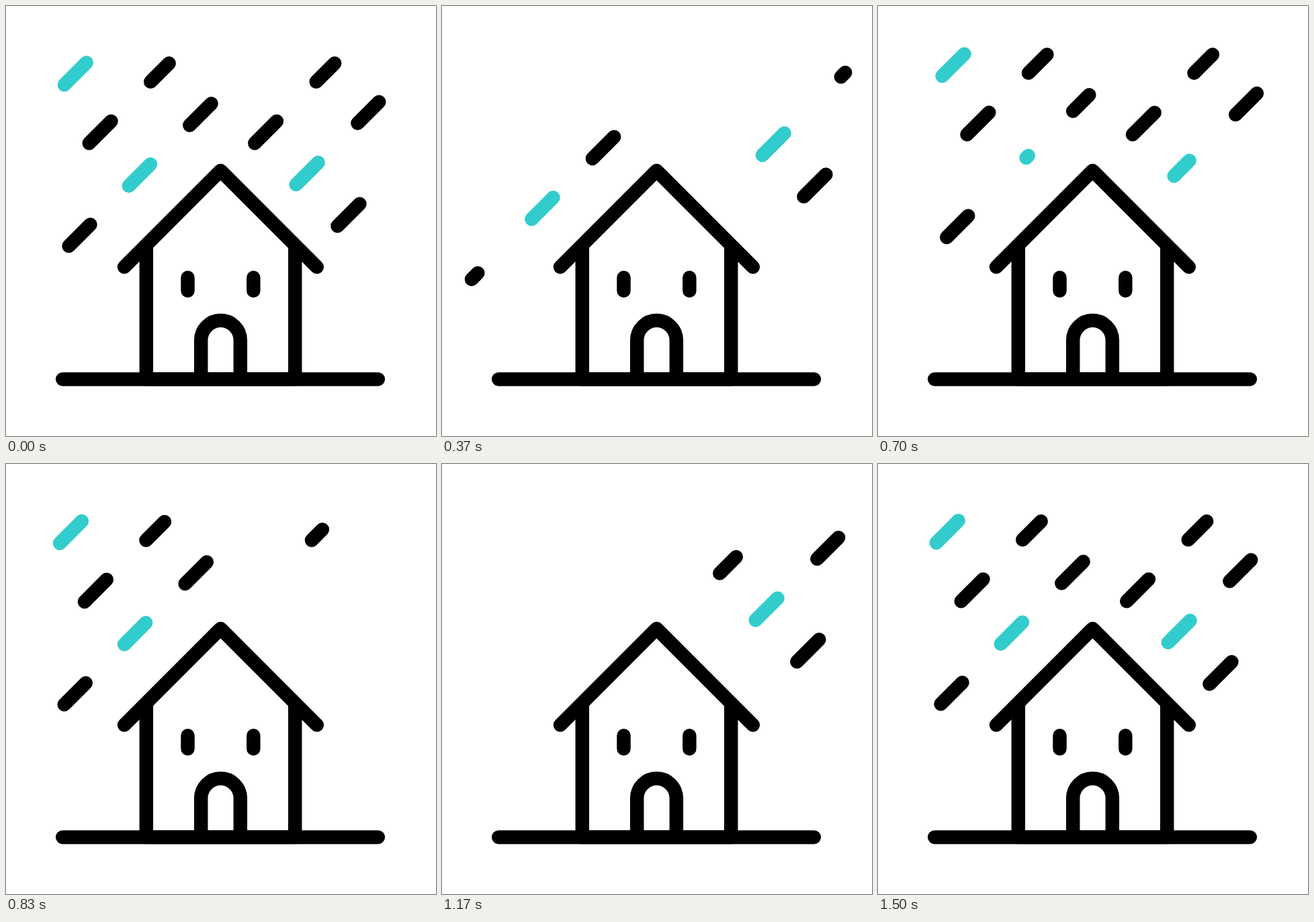
An HTML page with a canvas that plays this animation: 640x640 px, repeating every 1670 ms.

```html
<!DOCTYPE html>
<html lang="en">
<head>
<meta charset="utf-8">
<title>House in the rain</title>
<style>
  html, body { margin: 0; width: 100%; height: 100%; overflow: hidden; background: #fff; }
  canvas { display: block; width: 640px; height: 640px; }
</style>
</head>
<body>
<canvas id="stage" width="640" height="640"></canvas>
<script>
const ctx = document.getElementById('stage').getContext('2d');
const LOOP = 1670;
const LAST_STEP = 45;
const BLACK = '#000';
const TEAL = '#33cccc';

// Lower-left end, diagonal extent, colour, and the steps at which
// the drop starts to shrink (first pass) and to grow (second pass).
const drops = [
  [493.4, 327.5, 33.0, BLACK, 1.0, 7.5],
  [431.8, 265.8, 32.8, TEAL, 2.4, 8.6],
  [523.4, 174.6, 31.8, BLACK, 4.55, 10.6],
  [370.2, 204.2, 32.7, BLACK, 5.0, 11.5],
  [461.7, 112.7, 27.5, BLACK, 6.16, 13.4],
  [123.7, 204.2, 32.8, BLACK, 7.0, 14.0],
  [215.2, 112.7, 27.5, BLACK, 8.0, 14.8],
  [86.8, 117.2, 32.9, TEAL, 8.9, 16.55],
  [93.5, 357.2, 32.0, BLACK, 9.58, 18.0],
  [273.3, 177.5, 32.3, BLACK, 11.0, 19.5],
  [182.8, 267.8, 32.2, TEAL, 12.0, 20.8]
].map(([x, y, size, color, shrink, grow]) => ({ x, y, size, color, shrink, grow }));

const TRIM_STEPS = 2;

// Three overlapping falls: leaving, crossing and arriving.
const passes = [
  {
    shrinkDelay: 0,
    growDelay: -Infinity,
    shift(step) {
      const d = 0.889 * Math.pow(step, 1.676);
      return [-d, d];
    }
  },
  {
    shrinkDelay: 18,
    growDelay: 0,
    shift(step) {
      const u = step - 17;
      return [23.7 - 3.66 * u - 0.0186 * u * u, -25.7 + 3.13 * u + 0.0214 * u * u];
    }
  },
  {
    shrinkDelay: Infinity,
    growDelay: 22,
    shift(step) {
      const left = LAST_STEP - step;
      const d = 3.23 * left + 0.026 * left * left;
      return [d, -0.953 * d];
    }
  }
];

const clamp = v => Math.min(1, Math.max(0, v));

function stroke(color, trace) {
  ctx.strokeStyle = color;
  ctx.beginPath();
  trace();
  ctx.stroke();
}

function polyline(color, ...points) {
  stroke(color, () => points.forEach(([x, y]) => ctx.lineTo(x, y)));
}

function drawRain(step) {
  for (const pass of passes) {
    const [dx, dy] = pass.shift(step);
    for (const d of drops) {
      const grown = clamp((step - d.grow - pass.growDelay) / TRIM_STEPS);
      const lost = clamp((step - d.shrink - pass.shrinkDelay) / TRIM_STEPS);
      if (grown <= 0 || lost >= 1) continue;
      const x = d.x + dx, y = d.y + dy;
      const low = d.size * (1 - grown);
      const high = d.size * (1 - lost);
      polyline(d.color, [x + low, y - low], [x + high, y - high]);
    }
  }
}

function drawHouse() {
  polyline(BLACK, [84.2, 555.4], [553.8, 555.4]);
  polyline(BLACK, [208.8, 358], [208.8, 555.4], [430.2, 555.4], [430.2, 358]);
  polyline(BLACK, [176, 388.4], [319.4, 245], [462.8, 388.4]);
  for (const x of [270.5, 368.3]) polyline(BLACK, [x, 404.2], [x, 423.7]);
  stroke(BLACK, () => {
    ctx.moveTo(290.2, 555.4);
    ctx.arc(319.5, 497.4, 29.3, Math.PI, 0);
    ctx.lineTo(348.8, 555.4);
  });
}

// 30 steps per second, each starting on a whole hundredth of a second.
function stepAt(ms) {
  const tick = Math.floor(ms / 10);
  return Math.min(LAST_STEP, Math.floor((tick + 0.5) * 0.3));
}

let start;
function render(now) {
  start ??= now;
  ctx.fillStyle = '#fff';
  ctx.fillRect(0, 0, 640, 640);
  ctx.lineWidth = 20.5;
  ctx.lineCap = ctx.lineJoin = 'round';
  drawRain(stepAt((now - start) % LOOP));
  drawHouse();
  requestAnimationFrame(render);
}
requestAnimationFrame(render);
</script>
</body>
</html>
```
